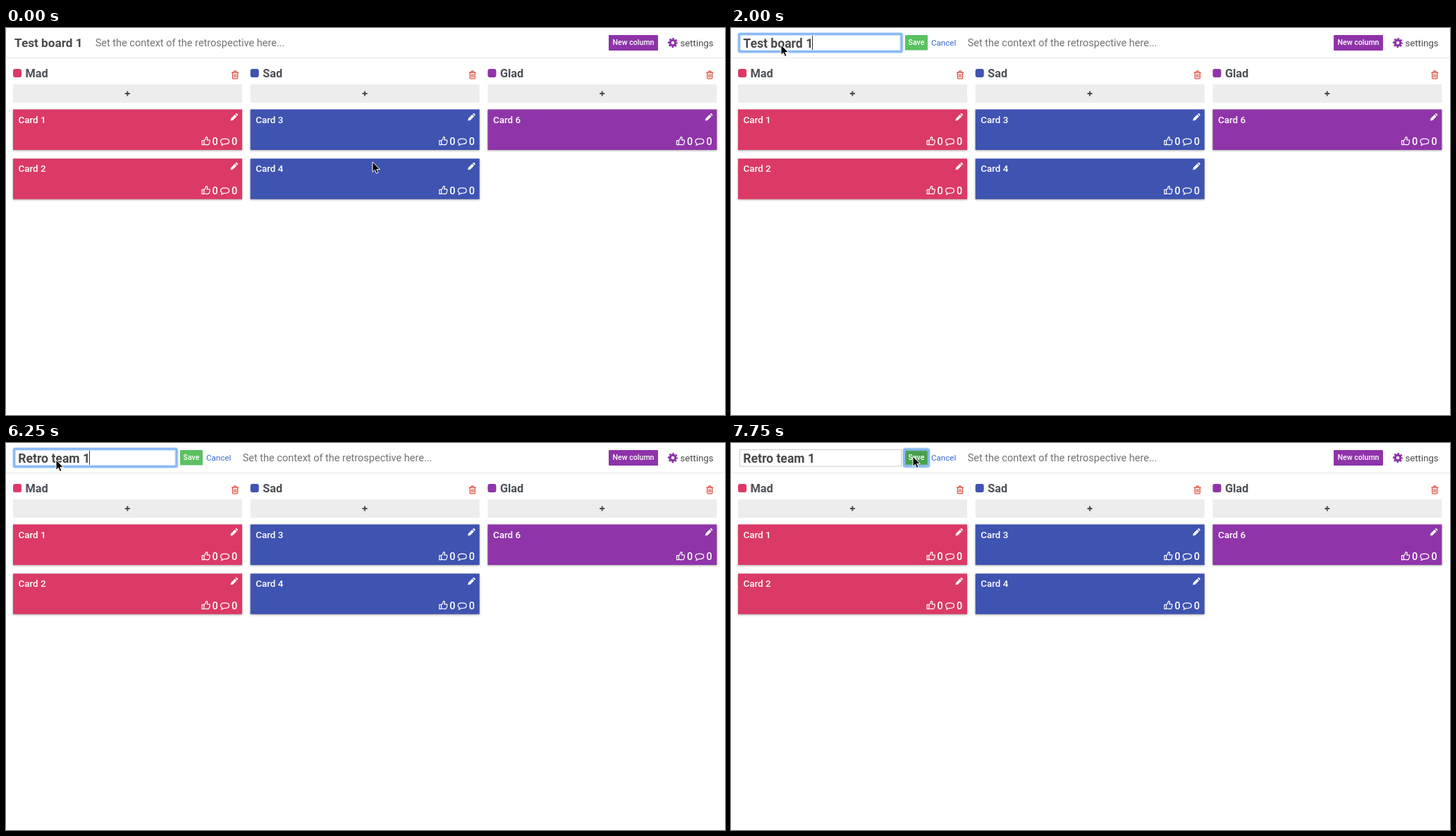
An HTML page that plays this animation: 1020 by 549 pixels, repeating every 8000 ms.

```html
<!DOCTYPE html>
<html lang="en">
<head>
<meta charset="utf-8">
<title>Retrospective board</title>
<style>
html, body { margin: 0; width: 100%; height: 100%; overflow: hidden; background: #fff; }
svg { display: block; width: 1020px; height: 549px; font-family: Roboto, sans-serif; white-space: pre; }
.title { font-size: 17.2px; font-weight: 700; fill: #4a4a4a; }
.head { font-size: 16.3px; font-weight: 700; fill: #4c5055; }
.note { font-size: 14.5px; fill: #737373; }
.button { font-size: 10.6px; font-weight: 500; fill: #fff; text-anchor: middle; }
.card { font-size: 13.4px; font-weight: 500; fill: #fff; }
.count { font-size: 14.5px; font-weight: 500; fill: #fff; }
.line { fill: none; stroke: #fff; stroke-width: 1.2; stroke-linejoin: round; }
.shade { filter: drop-shadow(0 1px 1.5px rgba(0, 0, 0, .35)); }
.ring { fill: none; stroke: #8abaf2; stroke-width: 3; filter: drop-shadow(0 0 1px #8abaf2); }
</style>
</head>
<body>
<svg id="stage" viewBox="0 0 1020 549">
  <defs>
    <path id="plus" d="M-3.5 0H3.5M0-3.5V3.5" stroke="#4a4a4a" stroke-width="1.9"/>
    <g id="trash" fill="none" stroke="#dd4a3c" stroke-width="1.2">
      <path d="M0 2.6H10M3 2.4L3.7.7H6.3L7 2.4M1.4 2.8V10.2Q1.4 11.4 2.5 11.4H7.5Q8.6 11.4 8.6 10.2V2.8"/>
      <path d="M3.4 4.8V9.5M5 4.8V9.5M6.6 4.8V9.5" stroke-width=".9"/>
    </g>
    <g id="pencil" fill="#fff">
      <path d="M0 10.5L.7 7.3 6.2 1.8 8.8 4.4 3.3 9.9ZM6.9 1.1L7.7.3Q8.3-.2 8.9.3L10.3 1.7Q10.8 2.3 10.3 2.9L9.5 3.7Z"/>
    </g>
    <g id="thumb" class="line">
      <path d="M.6 5.6H3.4V11.6H.6ZM3.4 6Q5.6 4.2 5.9 1.9 6.1.5 7 .6 8.6 1 8.1 3.2L7.6 4.8H10.6Q12 5 11.6 6.4 12 7.4 11.3 8.2 11.5 9.3 10.7 9.9 10.7 11.6 9 11.6H6.8Q5.2 11.6 3.4 10.9"/>
    </g>
    <path id="bubble" class="line" d="M7 .6C10.6.6 13 2.3 13 4.4S10.6 8.2 7 8.2L5.6 8.1Q4.1 9.6 2 9.9 3 8.7 3.1 7.3 1 6.2 1 4.4C1 2.3 3.4.6 7 .6Z"/>
  </defs>
  <path d="M0 42.5H1020" stroke="#e8e8e8"/>
  <g id="view">
    <text class="title" x="12" y="27">Test board 1</text>
  </g>
  <g id="edit">
    <rect x="12.5" y="9.5" width="229" height="23.5" fill="#fff" stroke="#ccc"/>
    <rect id="fieldRing" class="ring" x="11.5" y="8.5" width="230.5" height="25" rx="1"/>
    <rect id="selection" x="17" y="11" height="20" fill="#b3d7fe"/>
    <text id="field" class="title" x="17.3" y="27.5" style="font-size:17.6px"></text>
    <rect id="caret" y="11" width="1" height="20" fill="#333"/>
    <rect id="save" x="247" y="10" width="32" height="21.5" rx="1"/>
    <rect id="saveRing" class="ring" x="245.5" y="9" width="35" height="24" rx="2"/>
    <text class="button" x="263" y="24">Save</text>
    <text x="284" y="25.3" font-size="11.6" fill="#3069d2">Cancel</text>
  </g>
  <text id="note" class="note" y="26.3">Set the context of the retrospective here...</text>
  <rect x="855" y="10" width="70" height="22" rx="1" fill="#8e33a9"/>
  <text class="button" x="890" y="24">New column</text>
  <g transform="translate(946 21)" fill="none" stroke="#8e33a9">
    <circle r="3.8" stroke-width="3.2"/>
    <circle r="6" stroke-width="2.2" stroke-dasharray="2.6 2.112" stroke-dashoffset="1.3"/>
  </g>
  <text x="956.5" y="25.8" font-size="13.2" fill="#4a4a4a">settings</text>
  <g id="board"></g>
  <path id="cursor" d="M0 0V14.3L3.3 11.3 5.5 16.4 8 15.3 5.8 10.4H10.4Z" stroke="#fff" stroke-width="1"/>
</svg>
<script>
const $ = id => document.getElementById(id);
const set = (id, attrs) => { for (const k in attrs) $(id).setAttribute(k, attrs[k]); };
const show = (id, on) => set(id, { visibility: on ? 'inherit' : 'hidden' });

const card = (label, y, color) => `<g transform="translate(0 ${y})">
  <rect class="shade" width="325" height="57.5" fill="${color}"/>
  <text class="card" x="7.5" y="19">${label}</text>
  <use href="#pencil" x="308.5" y="5.5"/>
  <use href="#thumb" x="267.5" y="38.5"/><text class="count" x="282.5" y="50.3">0</text>
  <use href="#bubble" x="293.5" y="41"/><text class="count" x="310" y="50.3">0</text></g>`;

const column = ([name, color, cards], i) => `<g transform="translate(${10 + i * 336.7} 0)">
  <rect y="58" width="12" height="12" rx="3" fill="${color}"/>
  <text class="head" x="17.5" y="69.5">${name}</text>
  <use href="#trash" x="310" y="60.5"/>
  <rect y="80" width="325" height="26" rx="1" fill="#ededed"/>
  <use href="#plus" x="162.3" y="93"/>
  ${cards.map((n, j) => card('Card ' + n, 115.5 + j * 69.8, color)).join('')}</g>`;

$('board').innerHTML = [
  ['Mad', '#db3a66', [1, 2]],
  ['Sad', '#3f53b1', [3, 4]],
  ['Glad', '#8f35a9', [6]]
].map(column).join('');

// Each list holds [start time, value...]
const path = [[0, 520, 190], [250, 430, 138], [500, 230, 52], [750, 138, 24], [1000, 114, 21],
  [1250, 102, 21], [1500, 71, 24], [6250, 71, 24], [6500, 170, 2], [6750, 275, 12], [7000, 258, 19], [8000, 258, 19]];
const typing = [[0, 'Test board 1'], [3250, 'R'], [3500, 'Retr'], [4750, 'Retro'], [5000, 'Retro '],
  [5250, 'Retro t'], [5500, 'Retro te'], [5750, 'Retro tea'], [6000, 'Retro team'], [6250, 'Retro team 1']];
const blink = [[0, 0], [2000, 1], [2500, 0], [3250, 1], [4000, 0], [4500, 1], [6750, 0], [7000, 1], [7250, 0], [7500, 1], [7750, 0]];
const at = (list, t) => list.findLast(k => k[0] <= t);

function pointer(t) {
  const a = at(path, t), b = path[path.indexOf(a) + 1];
  const f = (t - a[0]) / (b[0] - a[0]);
  return [1, 2].map(i => a[i] + (b[i] - a[i]) * f);
}

function draw(now) {
  const t = Math.floor(now % 8000 / 250) * 250;
  const editing = t >= 1750, saved = t >= 7750;
  show('view', !editing);
  show('edit', editing);
  set('note', { x: editing ? 335.7 : 126.7 });
  $('field').textContent = at(typing, t)[1];
  const width = $('field').getComputedTextLength();
  set('selection', { width });
  set('caret', { x: Math.floor(17 + width) });
  show('selection', t >= 2500 && t < 3250);
  show('caret', at(blink, t)[1]);
  show('fieldRing', editing && !saved);
  show('saveRing', saved);
  set('save', { fill: t >= 7000 ? '#46a04c' : '#5ac160' });
  set('cursor', { transform: `translate(${pointer(t)})` });
}

const start = performance.now();
function tick() {
  draw(performance.now() - start);
  requestAnimationFrame(tick);
}
tick();
</script>
</body>
</html>
```
